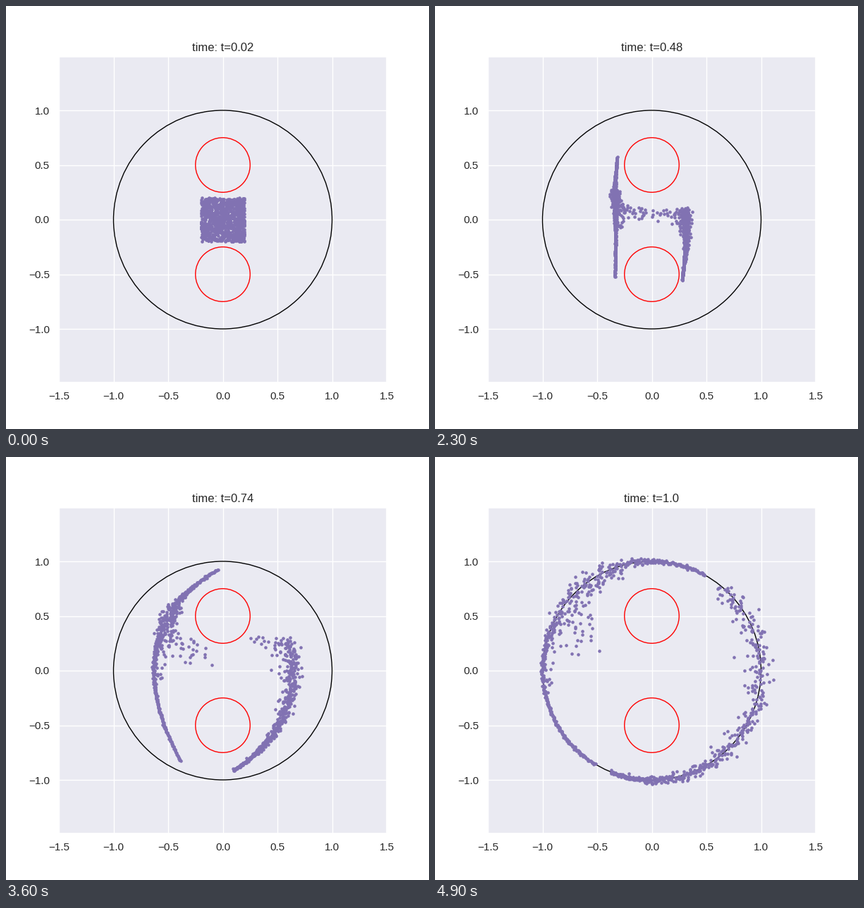
A matplotlib script for the animation above (5000 ms loop, 600x600 px).

```python
import numpy as np
import matplotlib.pyplot as plt
from matplotlib.animation import FuncAnimation

FRAMES, INTERVAL, COUNT = 50, 100, 1000
CUT = 0.12                              # where the square tears apart
T_STAR, T_BOW, T_RING = 0.32, 0.64, 1.0


def through(t, star, bow, ring):
    """Quadratic in time through the three key states."""
    a, b, c = T_STAR, T_BOW, T_RING
    return (star * (t - b) * (t - c) / ((a - b) * (a - c))
            + bow * (t - a) * (t - c) / ((b - a) * (b - c))
            + ring * (t - a) * (t - b) / ((c - a) * (c - b)))


def polar(x, y):
    return np.hypot(x, y), np.arctan2(y, x) % (2 * np.pi)


def ease(x):
    x = np.clip(x, 0, 1)
    return x * x * (3 - 2 * x)


class Band:
    """One half of the cloud, seen as the left half; z runs from tail -1 to lead 1."""

    def __init__(self, uv, cut, skew, waist, star_y, bow_y, ring_angle,
                 scatter, looseness, tips):
        self.start = 0.2 * uv
        self.depth = (uv[:, 0] + 1) / (1 + cut)
        order = uv[:, 1] * (1 - 0.7 * self.depth) - skew * self.depth
        z = 2 * np.argsort(np.argsort(order)) / (len(uv) - 1) - 1

        y = star_y(z)
        self.star = polar(-waist - y ** 2, y)
        y = bow_y(z)
        self.bow = polar(-0.51 + 0.36 * y ** 2 + 0.13 * y ** 3, y)
        self.ring = np.ones_like(z), np.radians(ring_angle(z))

        self.scatter = (0.006 + 0.05 * scatter(z)) * rng.normal(size=len(z))
        self.looseness = looseness(z) + 0.01
        self.tips = np.array(tips)
        self.jitter = rng.uniform(-0.12, 0.12, uv.shape)

    def flow(self, t):
        radius, angle = (through(t, *state) for state in zip(self.star, self.bow, self.ring))
        radius = radius + t * self.scatter
        pos = np.column_stack([radius * np.cos(angle), radius * np.sin(angle)])
        # Points from the middle of the square lag behind, towards the tip.
        power = 1 + 17 * ease((t - 0.3) / 0.2)
        lag = self.depth ** (power / self.looseness)
        tip = through(t, *self.tips) + t * self.jitter
        return pos + lag[:, None] * (tip - pos)

    def at(self, t):
        if t >= T_STAR:
            return self.flow(t)
        p = (t - 0.02) / (T_STAR - 0.02)
        squeeze = 1 - 0.25 * np.sin(np.pi * p)
        return squeeze * ((1 - p) * self.start + p * self.flow(T_STAR))


rng = np.random.default_rng(4)
uv = rng.uniform(-1, 1, (COUNT, 2))
is_left = uv[:, 0] < CUT

left = Band(
    uv[is_left], CUT, skew=0, waist=0.18,
    star_y=lambda z: 0.02 + 0.17 * z + 0.1 * z ** 5,
    bow_y=lambda z: 0.235 + 0.45 * z - 0.195 * z ** 2 + 0.33 * z ** 3,
    ring_angle=lambda z: 150 - 75 * z - 14 * z ** 3,
    scatter=lambda z: np.exp(-((z - 0.25) / 0.35) ** 2),
    looseness=lambda z: (1 - z ** 2) ** 2,
    tips=[(0.02, 0.01), (-0.04, 0.08), (-0.53, 0.28)])

# The right half is the same motion turned by 180 degrees.
right = Band(
    -uv[~is_left], -CUT, skew=1, waist=0.12,
    star_y=lambda z: 0.06 + 0.1 * z + 0.05 * z ** 2 + 0.06 * z ** 3,
    bow_y=lambda z: 0.3 + 0.5 * z,
    ring_angle=lambda z: 128 - 80 * z + 20 * z ** 2,
    scatter=lambda z: (1 - z) / 2,
    looseness=lambda z: ((1 - z) / 2) ** 3,
    tips=[(0, 0), (-0.15, -0.14), (-0.61, -0.69)])

plt.rcParams.update({"font.family": "Liberation Sans", "text.color": "#262626"})
fig = plt.figure(figsize=(6, 6), dpi=100, facecolor="white")
ax = fig.add_axes([0.125, 0.11, 0.775, 0.77], facecolor="#EAEAF2")
ax.set_axisbelow(True)
ax.grid(color="white", linewidth=1)
ax.tick_params(length=0, pad=9.5, labelsize=11, labelcolor="#262626")
for edge in ax.spines.values():
    edge.set(color="white", linewidth=1.25)
ax.set_xticks(np.arange(-1.5, 1.6, 0.5))
ax.set_yticks(np.arange(-1, 1.1, 0.5))
ax.set_xlim(-1.5, 1.5)
ax.set_ylim(-1.5 * 462 / 465, 1.5 * 462 / 465)

for y, radius, color in [(0, 1, "black"), (0.5, 0.25, "red"), (-0.5, 0.25, "red")]:
    ax.add_patch(plt.Circle((0, y), radius, fill=False, edgecolor=color, linewidth=1))

dots, = ax.plot([], [], "o", color="#8172B2", markersize=3.3, markeredgewidth=0)
title = ax.set_title("", fontsize=12)


def update(frame):
    t = round(0.02 * (frame + 1), 2)
    points = np.concatenate([left.at(t), -right.at(t)])
    dots.set_data(points[:, 0], points[:, 1])
    title.set_text(f"time: t={t}")
    return dots, title


animation = FuncAnimation(fig, update, frames=FRAMES, interval=INTERVAL,
                          repeat=True, repeat_delay=0)
plt.show()
```
